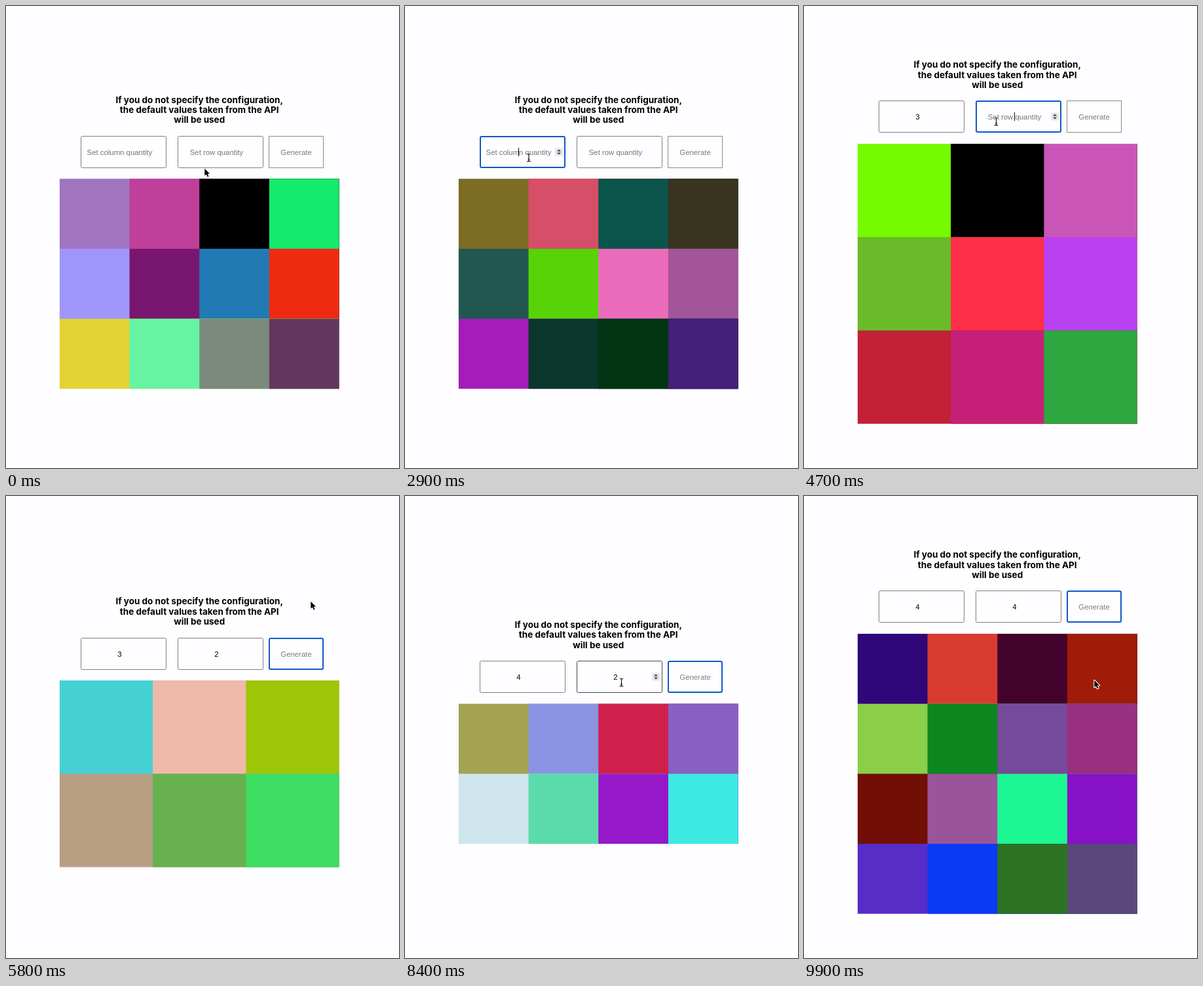
These frames come from a looping animation (600 by 704 pixels, 10000 ms). An HTML page with a canvas:

```html
<!DOCTYPE html>
<html lang="en">
<head>
<meta charset="utf-8">
<title>Colour grid generator</title>
<style>
  html, body { margin: 0; width: 100%; height: 100%; overflow: hidden; background: #fefdff; }
  canvas { display: block; }
</style>
</head>
<body>
<canvas id="stage" width="600" height="704"></canvas>
<script>
const ctx = document.getElementById('stage').getContext('2d');
const LOOP = 10000, STEP = 100;
const GRID_X = 81.9, GRID_W = 1280 / 3, MID_Y = 423.3;
const BLUE = '#1059c6';
const UI_FONT = '11.38px "Liberation Sans", Arial, sans-serif';
const TITLE_FONT = '700 13.5px Inter, sans-serif';
const TITLE = ['If you do not specify the configuration,',
  'the default values taken from the API', 'will be used'];

// Each entry: start time, columns, cell colours
const grids = [
  [0, 4, 'a174c0 bf3f9b 000000 14ea6c 9f96fb 78166f 227ab5 ee2b10 e3d334 66f4a4 7a897b 63365f'],
  [1200, 4, 'b660cb f01800 4aa1a0 fbdf18 56345a f1df2b aa477a 89ed34 67a1e4 5c798e b93a00 fb9a35'],
  [1800, 4, '7c6c24 d64e67 0b544b 383420 22574f 58d308 ea6bba a25598 a51cba 0b362b 013512 451f7a'],
  [3800, 3, '74fb00 000000 c956b7 69bb29 fe2f47 ba41f2 c22138 c72079 2da73f'],
  [5800, 3, '45d1d4 efb9aa 9fc507 b89e83 68b150 3edd64'],
  [7800, 4, 'a3a352 8a94e3 d11f4c 8a5fc4 cfe6ef 5bdbab 9518c9 3ceae4'],
  [9600, 4, '300779 d83b31 43022c 9f1c08 8acf47 0c861f 764a9a 992f80 ' +
            '710e05 9b5499 1cf793 8611c6 582cc6 0a3af5 2d7323 5a487c'],
].map(([time, cols, list]) => [time, { cols, colors: list.split(' ') }]);

const focusKeys = [[0, ''], [1200, 'button'], [2700, 'cols'], [3800, 'button'], [4700, 'rows'],
  [5800, 'button'], [6700, 'cols'], [7800, 'button'], [8500, 'rows'], [9600, 'button']];

const fields = [
  { id: 'cols', x: 114.5, w: 130, hint: 'Set column quantity',
    keys: [[0, ''], [3200, '3'], [7200, '4']], selected: [6800, 7200] },
  { id: 'rows', x: 262.5, w: 130, hint: 'Set row quantity',
    keys: [[0, ''], [5000, '2'], [8800, '4']], selected: [8600, 8800] },
];

const path = [[100, 303, 247], [1000, 438, 228], [2100, 438, 228], [2600, 189, 231],
  [3400, 189, 231], [3700, 443, 225], [4000, 443, 225], [4500, 293.5, 176], [5100, 293.5, 176],
  [5600, 465, 160], [5900, 465, 160], [6400, 180, 242], [7400, 180, 242], [7700, 440, 243],
  [7900, 440, 243], [8400, 330.5, 284], [9000, 330.5, 284], [9400, 443, 277],
  [9700, 443, 277], [9900, 443, 280]];
const typing = [[3200, 3400], [5000, 5100], [7200, 7400], [8800, 9000]];

const within = ([from, to], t) => t >= from && t < to;
const at = (keys, t) => keys.findLast(([time]) => time <= t)[1];

function pointer(t) {
  const i = path.findIndex(([time]) => time > t);
  if (i === 0) return { x: path[0][1], y: path[0][2] };
  if (i < 0) return { x: path.at(-1)[1], y: path.at(-1)[2] };
  const [t0, x0, y0] = path[i - 1], [t1, x1, y1] = path[i];
  const p = (t - t0) / (t1 - t0), e = p * p * (3 - 2 * p);
  return { x: x0 + (x1 - x0) * e, y: y0 + (y1 - y0) * e };
}

function text(str, x, y, color, font) {
  ctx.font = font;
  ctx.fillStyle = color;
  ctx.textAlign = 'center';
  ctx.fillText(str, x, y);
}

function poly(points, x, y) {
  ctx.beginPath();
  points.forEach(([px, py]) => ctx.lineTo(x + px, y + py));
  ctx.closePath();
}

function frame(x, y, w, h, focused, color, radius) {
  const inset = focused ? 0.5 : 0;
  ctx.beginPath();
  ctx.roundRect(x + inset, y + inset, w - 2 * inset, h - 2 * inset, focused ? 2 : radius);
  ctx.lineWidth = focused ? 2 : 1;
  ctx.strokeStyle = focused ? BLUE : color;
  ctx.stroke();
}

// Every cell reaches the far corner, so later cells blend into their neighbours at the seams.
function drawGrid({ cols, colors }, top) {
  const size = GRID_W / cols, height = colors.length / cols * size;
  colors.forEach((color, i) => {
    const x = i % cols * size, y = Math.floor(i / cols) * size;
    ctx.fillStyle = '#' + color;
    ctx.fillRect(GRID_X + x, top + y, GRID_W - x, Math.min(size + 1, height - y));
  });
}

function drawSpinner(x, y) {
  ctx.fillStyle = '#e8e7eb';
  ctx.fillRect(x - 6, y - 6, 12, 12);
  ctx.fillStyle = '#3c3c3c';
  for (const dir of [-1, 1]) {
    poly([[-3, dir], [3, dir], [0, dir * 4]], x, y);
    ctx.fill();
  }
}

function drawField(field, y, t, focused, hover) {
  const { x, w } = field, center = x + w / 2 - 6, mid = y + 24;
  const value = at(field.keys, t);
  frame(x, y, w, 48, focused, hover ? '#4c4c4c' : '#808080', 2);
  const selected = within(field.selected, t);
  if (selected) {
    ctx.fillStyle = '#b3d4fc';
    ctx.fillRect(center - 3.5, mid - 6.5, 7, 13);
  }
  text(value || field.hint, center, mid + 4, value ? '#000' : '#757575', UI_FONT);
  if (focused && !selected) {
    ctx.fillStyle = '#000';
    ctx.fillRect(Math.round(center + (value ? 2.6 : -0.4)), mid - 6.5, 1, 13);
  }
  if (focused || hover) drawSpinner(x + w - 9.5, mid);
}

function drawArrow({ x, y }) {
  poly([[0.3, 0.8], [0.3, 11.6], [2.8, 9.4], [4.8, 13.6], [6.5, 12.8], [4.7, 8.7], [8, 8.5]], x, y);
  ctx.lineJoin = 'round';
  ctx.lineWidth = 2.2;
  ctx.strokeStyle = '#fff';
  ctx.stroke();
  ctx.fillStyle = '#000';
  ctx.fill();
}

function drawBeam({ x, y }) {
  ctx.beginPath();
  for (const dir of [-1, 1]) {
    ctx.moveTo(x - 2.8, y + dir * 6);
    ctx.quadraticCurveTo(x, y + dir * 6, x, y + dir * 4);
    ctx.quadraticCurveTo(x, y + dir * 6, x + 2.8, y + dir * 6);
  }
  ctx.moveTo(x, y - 5);
  ctx.lineTo(x, y + 5);
  ctx.moveTo(x - 1.5, y + 2.5);
  ctx.lineTo(x + 1.5, y + 2.5);
  for (const [width, color] of [[2.6, '#fff'], [1.2, '#111']]) {
    ctx.lineWidth = width;
    ctx.strokeStyle = color;
    ctx.stroke();
  }
}

function draw(t) {
  const grid = at(grids, t), focus = at(focusKeys, t), mouse = pointer(t);
  const height = grid.colors.length / grid.cols * GRID_W / grid.cols;
  const top = MID_Y - height / 2;
  const formY = Math.round(top - 65.5) + 0.5;
  const hidden = typing.some(span => within(span, t));

  ctx.fillStyle = '#fefdff';
  ctx.fillRect(0, 0, 600, 704);
  TITLE.forEach((line, i) => text(line, 295.2, top - 115.8 + i * 15.4, '#000', TITLE_FONT));
  drawGrid(grid, top);

  let overField = false;
  for (const field of fields) {
    const hover = mouse.x > field.x && mouse.x < field.x + field.w &&
      mouse.y > formY && mouse.y < formY + 48;
    overField ||= hover;
    drawField(field, formY, t, focus === field.id, hover);
  }
  frame(401.5, formY, 83, 48, focus === 'button', '#8a8a86', 0);
  text('Generate', 443, formY + 28, '#7d7d7d', UI_FONT);

  if (!hidden) (overField ? drawBeam : drawArrow)(mouse);
}

const start = performance.now();
function tick() {
  const elapsed = (performance.now() - start) % LOOP;
  draw(Math.floor(elapsed / STEP) * STEP);
  requestAnimationFrame(tick);
}
tick();
</script>
</body>
</html>
```
